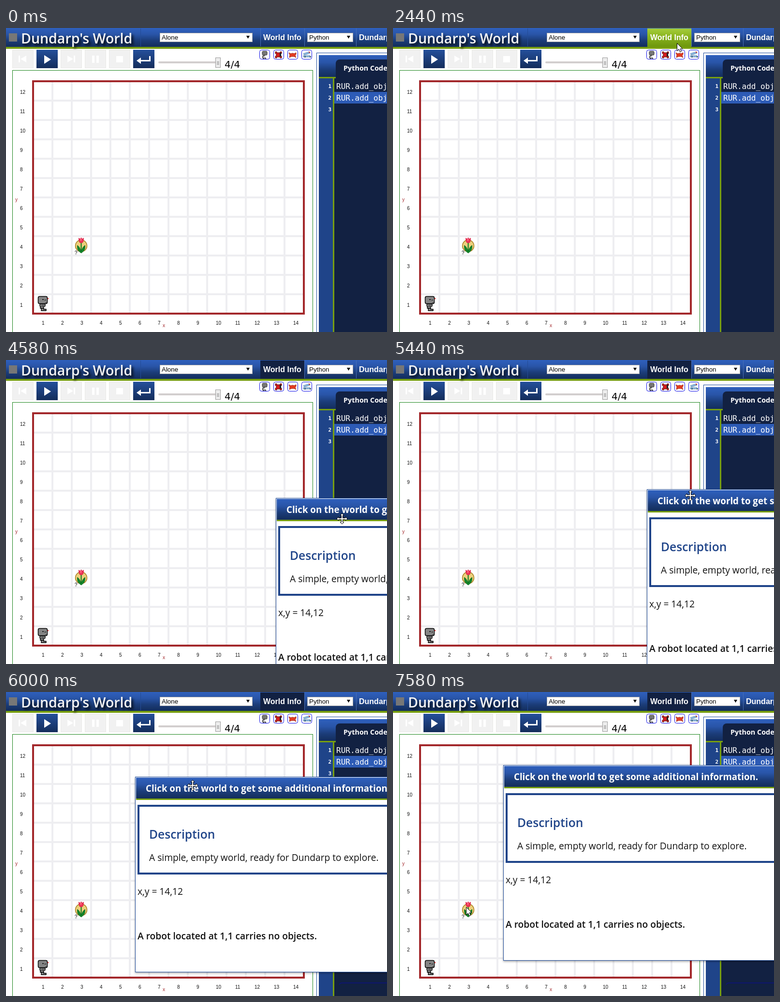
An HTML page with a canvas that plays this animation: 788 px wide and 628 px high, repeating every 8 s.

```html
<!DOCTYPE html>
<html lang="en">
<head>
<meta charset="utf-8">
<title>Robot world</title>
<style>
html, body { margin: 0; width: 100%; height: 100%; overflow: hidden; background: #fff; }
canvas { display: block; }
</style>
</head>
<body>
<canvas id="stage" width="788" height="628"></canvas>
<script>
const ctx = document.getElementById('stage').getContext('2d');
const LOOP = 8000;
const NAVY = '#122142', BLUE = '#1f4489', BRIGHT = '#2d5bb6', OLIVE = '#789f10';
const ARIAL = '"Liberation Sans", Arial, sans-serif';
const HUMANIST = '"Open Sans", "Noto Sans", sans-serif';
const MONO = '"DejaVu Sans Mono", monospace';

// Each key is [time, x, y, easing of the segment that ends here].
const smooth = p => p * p * (3 - 2 * p);
const slowing = p => 1 - (1 - p) ** 2;
const cursorKeys = [
  [1050, 712, 628], [1860, 622, 146], [2440, 587, 31, slowing],
  [4080, 587, 31], [4580, 695, 328, smooth],
  [4700, 695, 328], [4750, 699, 325], [4980, 698, 326], [5100, 698, 312],
  [5220, 698, 312], [5440, 616, 280], [5790, 437, 216], [6000, 386, 193],
  [6200, 369, 178], [6700, 369, 178], [7350, 147, 400, smooth],
  [7510, 151, 440, slowing], [7540, 151, 440], [7580, 151, 444]
];
const dialogKeys = [
  [5240, 559, 286], [5440, 527, 268], [5790, 317, 194],
  [6000, 269, 176], [6030, 250, 165], [6200, 229, 152]
];

function along(keys, t) {
  const i = keys.findIndex(k => k[0] > t);
  if (i < 1) return keys.at(i).slice(1, 3);
  const [t0, x0, y0] = keys[i - 1], [t1, x1, y1, ease = p => p] = keys[i];
  const p = ease((t - t0) / (t1 - t0));
  return [x0 + (x1 - x0) * p, y0 + (y1 - y0) * p];
}

function rect(x, y, w, h, fill) {
  ctx.fillStyle = fill;
  ctx.fillRect(x, y, w, h);
}

function frame(x, y, w, h, color, line = 1) {
  ctx.strokeStyle = color;
  ctx.lineWidth = line;
  ctx.strokeRect(x + line / 2, y + line / 2, w - line, h - line);
}

function rounded(x, y, w, h, r, fill, stroke, line = 1) {
  ctx.beginPath();
  ctx.roundRect(x, y, w, h, r);
  paint(fill, stroke, line);
}

function paint(fill, stroke, line = 1, path) {
  ctx.lineWidth = line;
  if (fill) { ctx.fillStyle = fill; path ? ctx.fill(path) : ctx.fill(); }
  if (stroke) { ctx.strokeStyle = stroke; path ? ctx.stroke(path) : ctx.stroke(); }
}

function shape(d, x, y, fill, stroke, line) {
  ctx.save();
  ctx.translate(x, y);
  paint(fill, stroke, line, new Path2D(d));
  ctx.restore();
}

function text(s, x, y, font, fill, align = 'left') {
  ctx.font = font;
  ctx.fillStyle = fill;
  ctx.textAlign = align;
  ctx.fillText(s, x, y);
}

function fade(y, h, ...colors) {
  const g = ctx.createLinearGradient(0, y, 0, y + h);
  colors.forEach((c, i) => g.addColorStop(i / (colors.length - 1), c));
  return g;
}

const blueFade = (y, h) => fade(y, h, '#2f60bd', '#2955a8', '#1b3c78', '#132d5b');

function select(x, w, label) {
  rect(x, 10, w, 19, '#fff');
  frame(x, 10, w, 19, '#a9a9a9');
  text(label, x + 4, 24, '13.33px ' + ARIAL, '#000');
  shape('M0 0h7l-3.5 6z', x + w - 13, 16, '#000');
}

function header(hover, active) {
  rect(0, 0, 788, 39, blueFade(0, 39));
  rect(0, 39, 788, 4, OLIVE);
  for (const x of [278, 526, 617, 724]) rect(x, 1, 1, 37, x === 278 ? '#244c96' : '#4a70b5');
  if (hover) rect(526, 1, 91, 38, fade(1, 38, '#a6ce3a', '#86b01c', '#6d960c'));
  else if (active) rect(526, 1, 91, 38, NAVY);

  rect(6, 11, 17, 17, '#777');
  ctx.save();
  ctx.shadowColor = '#000c';
  ctx.shadowOffsetX = ctx.shadowOffsetY = 4;
  ctx.shadowBlur = 5;
  text("Dundarp's World", 31, 32, '600 28.5px ' + HUMANIST, '#f4f4f4');
  ctx.restore();

  select(318, 192, 'Alone');
  text('World Info', 532, 25, 'bold 16px ' + ARIAL, '#fff');
  select(623, 95, 'Python');
  text("Dundarp's Keyboard", 730, 25, 'bold 16px ' + ARIAL, '#fff');
}

function toolbar() {
  const icons = [
    'M13 12h3v14h-3zM29 12v14l-12-7z', 'M16 11l14 9-14 9z',
    'M14 12l12 7-12 7zM27 12h3v14h-3z', 'M15 12h5v15h-5zM24 12h5v15h-5z',
    'M15 13h14v13H15z', 'M33 13h3v11H16v5l-9-6.5 9-6.5v5h17z'
  ];
  icons.forEach((icon, i) => {
    const x = 13 + 50 * i, enabled = i === 1 || i === 5;
    rect(x, 45, 44, 38, enabled ? fade(45, 38, '#244f9b', '#142d5b') : '#f1f1f1');
    if (!enabled) frame(x, 45, 44, 38, '#e9e9e6');
    shape(icon, x, 45, '#fff');
  });
  rounded(315, 69, 124, 4, 2, '#d2cece');
  rect(433, 61, 11, 21, '#eee');
  frame(433, 61, 11, 21, '#999');
  for (let y = 69; y < 76; y += 2) rect(436, y, 5, 1, '#999');
  text('4/4', 452, 82, '20px "DejaVu Sans", sans-serif', '#000');

  for (let i = 0; i < 4; i++) rounded(524.5 + 29 * i, 45.5, 21, 19, 4, '#fff', '#1010e8');
  rounded(530, 48, 10, 8, 2, '#777', '#333');
  shape('M4 0v3H1v4h6v2M3 7v2', 530, 55, null, '#333', 1.6);
  shape('M0 0h3v2h7v-2h3v4h-2v5h2v4h-3v-2h-7v2h-3v-4h2v-5h-2z', 557, 49, '#d51c1c', '#5b1010');
  rect(566, 51, 3, 8, '#222');
  shape('M0 1l4 2 4-1 3 1 4-2v3l-2 3 2 4-4-2h-6l-4 2 1-5z', 585, 50, '#e43c22', '#a82f22');
  shape('M1 5l12-4 2 3-12 4zM1 9h14v3H1z', 614, 48, '#8cbbe6', '#6a8dac');
  for (const x of [617, 628]) rounded(x, 58, 3, 3, 1.5, '#356');
  rect(626, 49, 3, 2, '#d33');
}

function robot(x, y) {
  rounded(x + .5, y + .5, 19, 15, 3, '#858585', '#000', 1.4);
  rect(x + 9, y + 6, 3, 2, '#222');
  rect(x + 14, y + 7, 2, 2, '#222');
  rect(x + 15, y + 13, 4, 1, '#333');
  rect(x + 20, y + 4, 2, 2, '#e02020');
  rounded(x + 4, y + 16, 11, 5, 1, '#999', '#000', 1.4);
  shape('M5 21v4h7v-3M7 25v5h10v-3h-5v-2', x, y, '#888', '#000', 1.4);
  rect(x + 7, y + 18, 6, 1, '#333');
}

function tulip() {
  ctx.beginPath();
  ctx.arc(155.5, 450, 12, 0, 7);
  paint('#ecd07c', '#a27a18', 1.4);
  shape('M0 0v19', 155.5, 444, null, '#0b7a20', 2);
  shape('M0 19C-9 13-8 8-8 3-3 6-2 11 0 15 2 11 3 6 8 3 8 8 9 13 0 19z', 155.5, 446, '#12852a', '#075d18', .7);
  shape('M-5-5L-2-3 0-6 2-3 5-5C5 2 4 5 0 5S-5 2-5-5z', 155.5, 439, '#ec3355', '#cf2045', .8);
  rect(154, 435, 2, 5, '#ff7188');
  text('?', 142, 468, '10px ' + ARIAL, '#000');
}

function world() {
  frame(13, 87, 622, 560, '#1d861d');
  for (let x = 94; x < 600; x += 40) rect(x, 110, 4, 480, '#eeeef1');
  for (let y = 148; y < 580; y += 40) rect(56, y, 560, 4, '#eeeef1');
  frame(54, 108, 564, 484, '#a3282b', 4);
  const label = (s, x, y, color = '#111') => text(s, x, y, '10px ' + ARIAL, color);
  for (let n = 1; n <= 14; n++) {
    label(n, 34 + 40 * n, 613);
    if (n <= 12) label(n, 29, 616 - 40 * n);
  }
  label('y', 19, 358, '#a3282b');
  label('x', 324, 618, '#a3282b');
  tulip();
  robot(66, 554);
}

function editor(withRule) {
  frame(642, 51, 160, 600, '#1d4b9b');
  rect(647, 56, 141, 572, NAVY);
  rect(647, 56, 141, 46, blueFade(56, 46));
  rounded(682, 65, 120, 60, [8, 0, 0, 0], NAVY);
  text('Python Code', 698, 88, 'bold 14.4px ' + HUMANIST, '#fff');
  rect(647, 101, 35, 3, OLIVE);
  rect(647, 104, 29, 524, BLUE);
  rect(676, 104, 3, 524, OLIVE);
  rect(679, 104, 109, 524, NAVY);
  rect(679, 132, 109, 24, BRIGHT);
  for (let n = 1; n <= 3; n++) {
    text(n, 673, 100 + 24 * n, 'bold 11px ' + MONO, '#fff', 'right');
    if (n < 3) text('RUR.add_object(', 683, 102 + 24 * n, '16px ' + MONO, '#fff');
  }
  if (withRule) shape('M0 4Q1 0 5 0H100', 689, 601, null, '#0b0b9c');
}

function dialog(x, y, lifted) {
  ctx.save();
  ctx.translate(Math.round(x), Math.round(y));
  ctx.save();
  ctx.shadowColor = lifted ? '#0006' : '#0005';
  ctx.shadowOffsetY = lifted ? 4 : 2;
  ctx.shadowBlur = lifted ? 9 : 4;
  rect(-1, -1, 700, 404, '#fff');
  ctx.restore();
  frame(-1, -1, 700, 404, '#1d4b9b');
  rect(1, 1, 700, 43, blueFade(1, 43));
  rect(1, 44, 700, 3, OLIVE);
  text('Click on the world to get some additional information.', 21, 30, 'bold 18.7px ' + HUMANIST, '#fff');
  frame(4, 57, 700, 144, BLUE, 4);
  text('Description', 28, 127, '600 24.6px ' + HUMANIST, BLUE);
  const body = '19.2px ' + HUMANIST;
  text('A simple, empty world, ready for Dundarp to explore.', 28, 173, body, '#111');
  text('x,y = 14,12', 4, 243, body, '#111');
  text('A robot located at 1,1 carries no objects.', 4, 335, '600 ' + body, '#111');
  ctx.restore();
}

const ARROW = 'M.5.5v16l3.7-3.6 2.5 5.7 2.8-1.2-2.4-5.5h4.7z';
const MOVE = 'M0-11l4 4H1.5v5.5H7V-4l4 4-4 4V1.5H1.5V7H4l-4 4-4-4h2.5V1.5H-7V4l-4-4 4-4v2.5h5.5V-7H-4z';

function draw(t) {
  const [cx, cy] = along(cursorKeys, t).map(Math.round);
  const open = t >= 3620, [dx, dy] = t < 5240 ? [559, 286] : along(dialogKeys, t);
  const hover = t >= 1060 && cx >= 526 && cx < 617 && cy < 39;
  rect(0, 0, 788, 628, '#fff');
  header(hover, open);
  toolbar();
  world();
  editor(t > 5900);
  if (open) dialog(dx, dy, t >= 6510 && t < 6580);
  if (t < 1060) return;
  const onTitle = open && cx >= dx && cy >= dy && cy < dy + 47;
  shape(onTitle ? MOVE : ARROW, cx, cy, '#fff', '#000', 1);
}

function tick(now) {
  draw(now % LOOP);
  requestAnimationFrame(tick);
}
requestAnimationFrame(tick);
</script>
</body>
</html>
```
